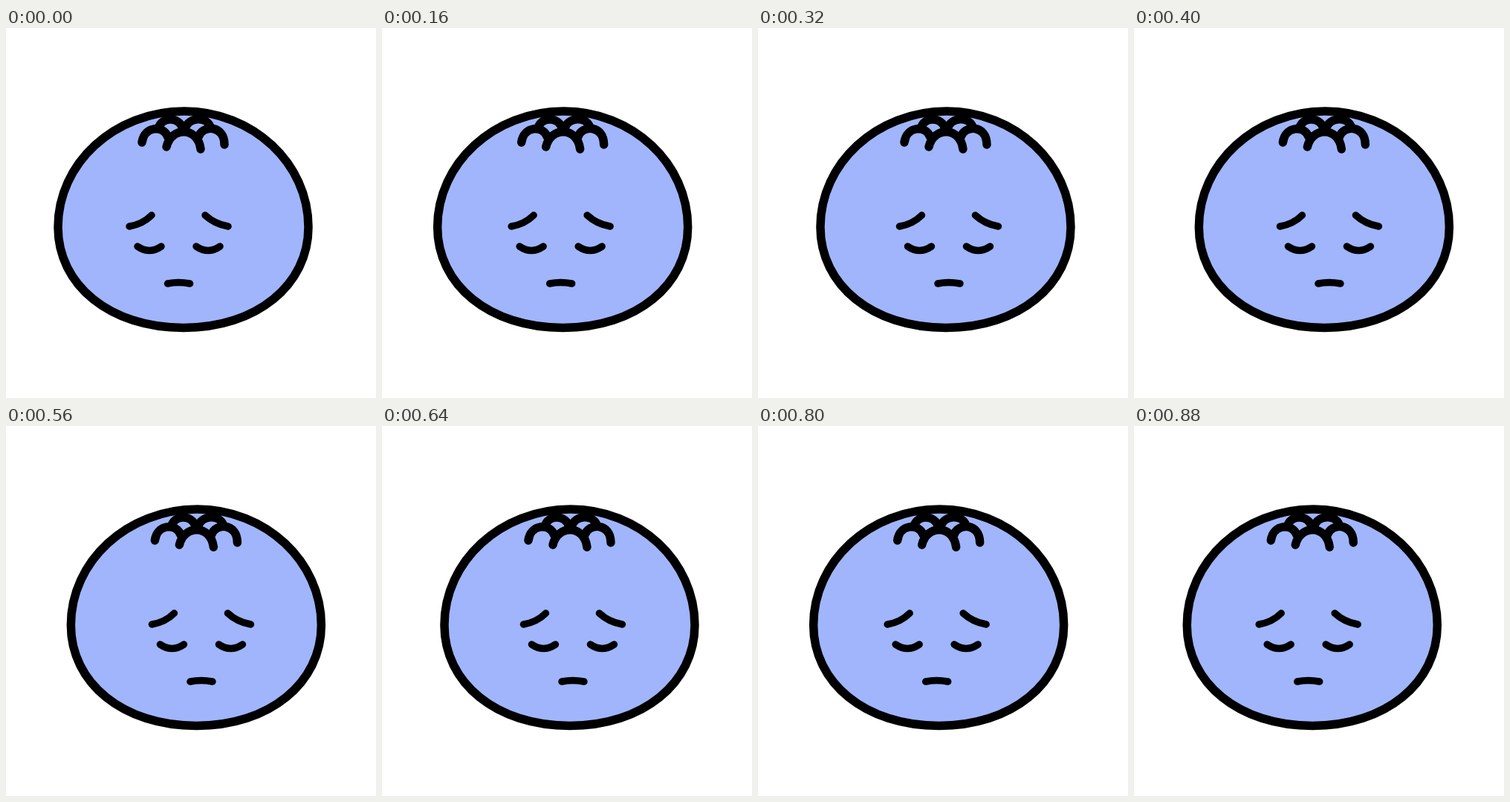
Recreate the animation shown at these times as an HTML page. Size 498x498 px, loop 960 ms.

```html
<!DOCTYPE html>
<html lang="en">
<head>
<meta charset="utf-8">
<title>Shaking head</title>
<style>
  html, body { margin: 0; width: 100%; height: 100%; overflow: hidden; background: #fff; }
  svg { display: block; width: 498px; height: 498px; }
  path { fill: none; stroke: #000; stroke-linecap: round; stroke-linejoin: round; }
  #head path { stroke-width: 11.5; }
  #head .skin { fill: #a0b5fb; }
  #face path { stroke-width: 9.5; }
</style>
</head>
<body>
<svg viewBox="0 0 498 498">
  <g id="head">
    <path class="skin" d="M70 268C70 182 146 112 240 112C332 112 407 182 407 268C407 346 337 403.5 239 403.5C140 403.5 70 346 70 268Z"/>
    <path d="M205 135C210 119 232 119 238 135M241 135C247 119 270 119 275 133"/>
    <path d="M183 154C186 132 212 130 218 147M259 147C264 130 294 130 294 157"/>
    <path d="M216 160C222 133 258 132 262 163"/>
  </g>
  <g id="face">
    <path d="M166 267Q184 264 196 252M268 252Q281 264 299 267"/>
    <path d="M177 294Q193 305 209 294M256 294Q272 305 288 294"/>
    <path d="M217.5 344Q232 341 247.5 344"/>
  </g>
</svg>
<script>
  const LOOP = 960, STEP = 80;
  const head = document.getElementById('head');
  const face = document.getElementById('face');
  const start = performance.now();

  const shift = (el, x) => el.setAttribute('transform', `translate(${x.toFixed(2)} 0)`);

  // The face swings further than the head, which makes it seem to turn.
  function draw(now) {
    const t = Math.floor(Math.max(0, now - start) % LOOP / STEP) * STEP;
    const swing = (1 - Math.cos(2 * Math.PI * t / LOOP)) / 2;
    shift(head, 18.6 * swing);
    shift(face, 32.6 * swing);
    requestAnimationFrame(draw);
  }
  draw(start);
</script>
</body>
</html>
```
